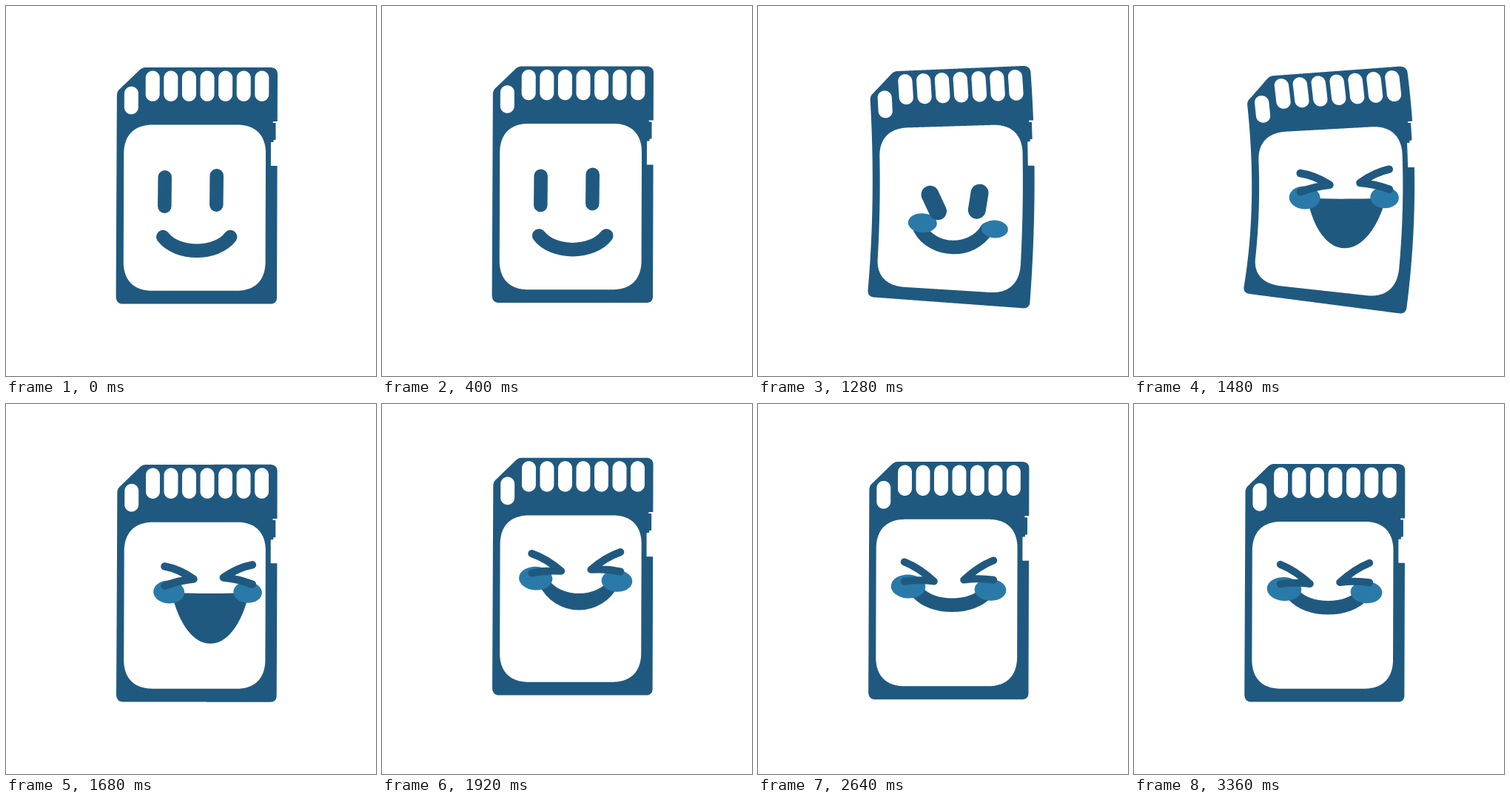
Write an HTML page with a canvas that moves like this. It is 500 px wide and 500 px high and loops after 3.4 s.

```html
<!DOCTYPE html>
<html lang="en">
<head>
<meta charset="utf-8">
<title>Happy memory card</title>
<style>
  html, body { margin: 0; width: 100%; height: 100%; overflow: hidden; background: #fff; }
  canvas { display: block; width: 100%; height: 100%; }
</style>
</head>
<body>
<canvas id="stage"></canvas>
<script>
const LOOP = 3400, STEP = 40, SIZE = 500;
const INK = '#20597f', BLUSH = '#2a7aa9', PAPER = '#fff';
const canvas = document.getElementById('stage');
const ctx = canvas.getContext('2d');
const ratio = window.devicePixelRatio || 1;
canvas.width = canvas.height = SIZE * ratio;
ctx.scale(ratio, ratio);
ctx.lineCap = ctx.lineJoin = 'round';

// Sample an SVG path so that it can be bent point by point.
function outline(d) {
  const path = document.createElementNS('http://www.w3.org/2000/svg', 'path');
  path.setAttribute('d', d);
  const n = Math.ceil(path.getTotalLength());
  const unit = path.getTotalLength() / n;
  return Array.from({ length: n }, (_, i) => path.getPointAtLength(i * unit));
}

// Rounded box; k sets how square the corners are (0.55 is a circle).
function box(x, y, w, h, r, k = 0.55) {
  const q = r * k, p = r - q;
  return outline(`M${x} ${y + r} c0 ${-q} ${p} ${-r} ${r} ${-r} h${w - 2 * r}
    c${q} 0 ${r} ${p} ${r} ${r} v${h - 2 * r} c0 ${q} ${-p} ${r} ${-r} ${r}
    h${2 * r - w} c${-q} 0 ${-r} ${-p} ${-r} ${-r} z`);
}

const card = outline(`M150 121 Q150 116 153 113 L180 87 Q184 83 189 83 H358 Q367 84 367 92
  V156 H361 V158 H364.8 V181 H361.8 V184 H358.3 V216 H367 V394
  Q367 402.6 358 402.6 H159 Q149.6 402.6 149.6 392 Z`);
const label = box(159.6, 160.5, 191.8, 224.3, 39, 0.64);
const pins = [box(160, 108.8, 19, 37.5, 9.5)];
for (let i = 0; i < 7; i++) pins.push(box(188.8 + i * 24.6, 87.6, 19, 41.2, 9.5));

// "Gap" is half the distance between a pair; "fold" turns an eye from a bar into a chevron.
const calm = {
  rise: 0,
  eyeX: 249.5, eyeY: 250, eyeGap: 35, eyeH: 19.7, eyeW: 18.5, fold: 0, tip: 0, splay: 0, skew: 0.2,
  cheekX: 265.5, cheekY: 293, cheekGap: 48.5, cheekDrop: 7, rx: 0, ry: 0,
  mouthX: 257.7, mouthY: 312, mouthGap: 45.5, sag: 25, lip: 18.5, open: 0
};
const squint = {
  ...calm,
  eyeX: 261.5, eyeY: 264, eyeGap: 29.7, eyeH: 11.5, eyeW: 24, splay: 3.5, skew: -1.8,
  rx: 19.5, ry: 13,
  mouthX: 258.5, mouthY: 300.5, mouthGap: 45, sag: 34
};
const laugh = {
  ...calm,
  eyeX: 273.5, eyeY: 231.5, eyeGap: 39.7, eyeH: 13.2, eyeW: 10.5, fold: 39, tip: 4, skew: 0,
  cheekX: 273.2, cheekY: 254, cheekGap: 53.2, cheekDrop: 0.5, rx: 21, ry: 15.5,
  mouthX: 276, mouthY: 256.5, mouthGap: 50, sag: 87, lip: 4, open: 1
};
const grin = {
  ...laugh,
  eyeX: 258, eyeY: 229, eyeGap: 40.2, eyeW: 10, fold: 40, tip: 13,
  cheekX: 258.5, cheekY: 250, cheekGap: 55.5, cheekDrop: 4.5, rx: 23.3, ry: 16,
  mouthX: 262.3, mouthY: 258, mouthGap: 46.5, sag: 23, lip: 18.5, open: 0
};
const raised = { ...grin, rise: 8.8, mouthY: grin.mouthY - 2 };

const linear = u => u;
const easeIn = u => u * u;
const easeOut = u => u * (2 - u);
const easeBoth = u => (1 - Math.cos(Math.PI * u)) / 2;

const faces = [
  [0, calm], [1140, calm], [1280, squint, easeIn], [1440, laugh, easeOut], [1700, laugh],
  [2040, raised, easeBoth], [2120, raised], [2320, grin, easeBoth], [LOOP, grin]
];
const hops = [[0, 0], [1700, 0], [1780, 2, easeBoth], [1920, -8.5, easeBoth], [2080, 0, easeBoth], [LOOP, 0]];
const stretches = [[0, 0], [1140, 0], [1680, 1.2], [LOOP, 2]];

function mix(a, b, u) {
  if (typeof a === 'number') return a + (b - a) * u;
  return Object.fromEntries(Object.keys(a).map(k => [k, mix(a[k], b[k], u)]));
}

function at(keys, t) {
  const i = keys.findIndex(k => k[0] > t);
  const [t0, a] = keys[i - 1], [t1, b, ease = linear] = keys[i];
  return mix(a, b, ease((t - t0) / (t1 - t0)));
}

// Bob, hop and sideways bend; the body is also slightly tilted and stretched.
function makeBend(t) {
  const u = (t - 1140) / 560;
  const lean = u > 0 && u < 1 ? 2.1 * Math.sin(Math.PI * u) ** 2 : 0;
  const hop = at(hops, t), stretch = at(stretches, t);
  const lift = hop - 1.75 * (1 - Math.cos(2 * Math.PI * t / 1700));
  return (x, y, body) => {
    const s = (y - 83) / 319, side = x - 257;
    const slope = -0.04 + 0.02 * s + 0.09 * s * s;
    let dx = lean * (24 * s * (1 - s) + side * 0.008);
    let dy = lean * (4 * (1 - s * s) + side * slope) + lift;
    if (body) {
      dx -= s + side * stretch * 0.003;
      dy -= stretch * (1 - s);
    }
    return [x + dx, y + dy];
  };
}

function fillShape(points, bend, color) {
  ctx.beginPath();
  points.forEach(p => ctx.lineTo(...bend(p.x, p.y, true)));
  ctx.closePath();
  ctx.fillStyle = color;
  ctx.fill();
}

function drawMouth(f, p) {
  const half = f.mouthGap, inner = half * 0.58, y = f.mouthY;
  const curve = (dir, sag) => ctx.bezierCurveTo(
    ...p(f.mouthX - dir * inner, y + sag), ...p(f.mouthX + dir * inner, y + sag), ...p(f.mouthX + dir * half, y));
  ctx.beginPath();
  ctx.moveTo(...p(f.mouthX - half, y));
  curve(1, f.sag);
  if (f.open > 0) {
    curve(-1, mix(f.sag, 2, f.open));
    ctx.closePath();
    ctx.fill();
  }
  ctx.lineWidth = f.lip;
  ctx.stroke();
}

function drawCheek(f, side, p) {
  const scale = side < 0 ? 1 : 0.92;
  const y = f.cheekY + (side < 0 ? 0 : f.cheekDrop);
  ctx.beginPath();
  ctx.ellipse(...p(f.cheekX + side * f.cheekGap, y), f.rx * scale, f.ry * scale, 0.05, 0, 2 * Math.PI);
  ctx.fill();
}

function drawEye(f, side, p) {
  const x = f.eyeX + side * f.eyeGap, y = f.eyeY - side;
  const out = side * f.fold / 2, tilt = side * f.splay + f.skew;
  ctx.beginPath();
  ctx.moveTo(...p(x + out + tilt, y - f.eyeH));
  ctx.quadraticCurveTo(
    ...p(x + tilt / 2, y + (f.tip - f.eyeH) / 2 - f.fold * 0.13), ...p(x - out, y + f.tip));
  ctx.quadraticCurveTo(
    ...p(x - tilt / 2, y + (f.tip + f.eyeH) / 2 - f.fold * 0.07), ...p(x + out - tilt, y + f.eyeH));
  ctx.lineWidth = f.eyeW;
  ctx.stroke();
}

function draw(t) {
  const bend = makeBend(t), face = at(faces, t);
  const onFace = (x, y) => bend(x, y - face.rise);
  ctx.fillStyle = PAPER;
  ctx.fillRect(0, 0, SIZE, SIZE);
  fillShape(card, bend, INK);
  [label, ...pins].forEach(hole => fillShape(hole, bend, PAPER));
  ctx.strokeStyle = ctx.fillStyle = INK;
  drawMouth(face, onFace);
  ctx.fillStyle = BLUSH;
  for (const side of [-1, 1]) drawCheek(face, side, onFace);
  for (const side of [-1, 1]) drawEye(face, side, onFace);
}

const start = performance.now();
function tick(now) {
  let t = Math.floor(Math.max(0, now - start) % LOOP / STEP) * STEP;
  if (t > 3000 && t < 3360) t = 3000; // rest before the last step
  draw(t);
  requestAnimationFrame(tick);
}
tick(start);
</script>
</body>
</html>
```
